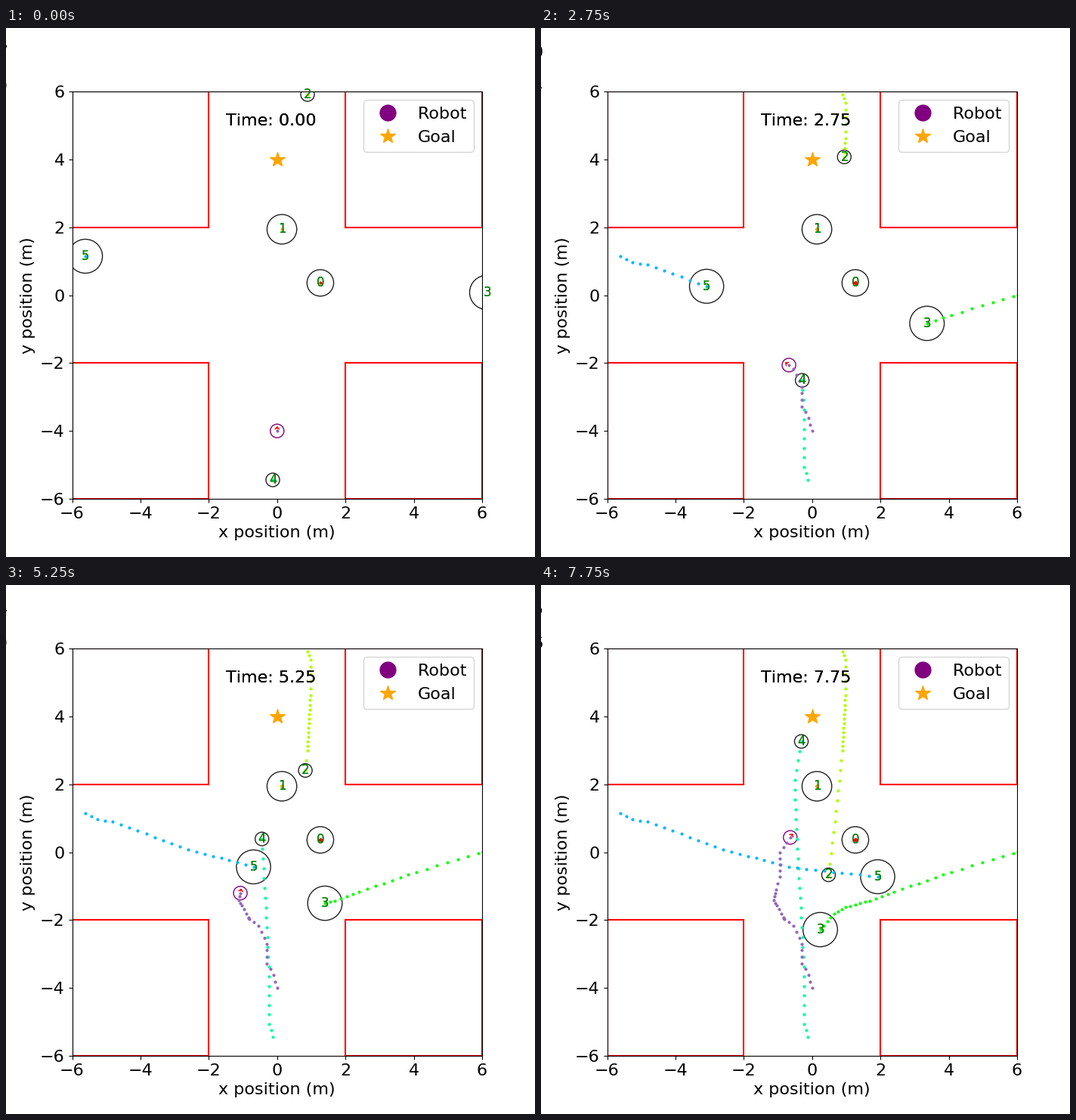
Recreate the animation shown at these times as a matplotlib script. Size 700 by 700 pixels, loop 8000 ms.

```python
import numpy as np
import matplotlib.pyplot as plt
from matplotlib.animation import FuncAnimation
from matplotlib.patches import ArrowStyle, Circle, FancyArrowPatch

STEPS, DT = 32, 0.25
ROBOT_R = 0.2


def path(*keys):
    """One position per step, linear between keys (step, x, y)."""
    t, x, y = np.transpose(keys)
    steps = np.arange(STEPS)
    return np.column_stack([np.interp(steps, t, x), np.interp(steps, t, y)])


robot_path = path((0, 0, -4), (2, -.105, -3.62), (4, -.3, -3.28),
                  (7, -.3, -2.695), (10, -.54, -2.16), (12, -.817, -1.96),
                  (14, -.835, -1.935), (17, -1.034, -1.57),
                  (19, -1.118, -1.414), (22, -1.056, -1.102),
                  (24, -.954, -.724), (28, -.935, -.01), (31, -.64, .434))

# Radius and path of each person
PEOPLE = [
    (.39, path((0, 1.265, .361))),
    (.435, path((0, .14, 1.941))),
    (.2, path((0, .89, 5.91), (2, .968, 5.667), (7, .968, 4.61),
              (19, .885, 2.995), (24, .736, 1.525), (31, .481, -.668))),
    (.505, path((0, 6.14, .08), (2, 5.89, -.044), (8, 4.08, -.579),
                (15, 2.405, -1.169), (19, 1.687, -1.425),
                (24, .968, -1.625), (27, .636, -1.814), (31, .238, -2.282))),
    (.2, path((0, -.127, -5.443), (2, -.229, -5.065), (8, -.244, -3.38),
              (24, -.49, 1.258), (27, -.503, 2.126), (31, -.315, 3.262))),
    (.5, path((0, -5.613, 1.147), (2, -5.248, .968), (4, -4.82, .902),
              (13, -2.594, .078), (21, -.69, -.434), (31, 1.919, -.724))),
]


def double_text(x, y, text="", **style):
    """Text that is painted twice, which darkens its edges."""
    label = ax.text(x, y, text, **style)
    ax.add_artist(label)
    return label


plt.rcParams.update({"font.family": "DejaVu Sans", "text.kerning_factor": 6})
fig, ax = plt.subplots(figsize=(7, 7), dpi=100)
ax.set(xlim=(-6, 6), ylim=(-6, 6))
ax.tick_params(labelsize=16)
ax.set_xlabel("x position (m)", fontsize=16)
ax.set_ylabel("y position (m)", fontsize=16)

for sx in (-1, 1):
    for sy in (-1, 1):
        ax.plot(sx * np.array([2, 6, 6, 2, 2]),
                sy * np.array([2, 2, 6, 6, 2]), color="red")

goal, = ax.plot([0], [4], "*", color="orange", ms=15)
robot_key = plt.Line2D([], [], marker="o", ls="none", color="purple", ms=15)
ax.legend([robot_key, goal], ["Robot", "Goal"], fontsize=16, loc="upper right")

cmap = plt.get_cmap("hsv", 10)
dots = dict(marker="o", ls="none", ms=3, mew=0)
trails = [ax.plot([], [], color=cmap(i), **dots)[0]
          for i in range(len(PEOPLE))]
robot_trail, = ax.plot([], [], color="tab:purple", **dots)

rings = [ax.add_patch(Circle((0, 0), r, fill=False, ec="0.13"))
         for r, _ in PEOPLE]
robot = ax.add_patch(Circle((0, 0), ROBOT_R, fill=False, ec="purple"))
arrow = ax.add_patch(FancyArrowPatch(
    (0, 0), (0, 1), color="red",
    arrowstyle=ArrowStyle("->", head_length=2, head_width=2)))

numbers = [double_text(0, 0, str(i), color="green", fontsize=12)
           for i in range(len(PEOPLE))]
clock = double_text(-1.5, 5, fontsize=16)

# Last digits of two score lines, nearly cut off by the left edge
scores = [ax.text(-8.2, y, "", fontsize=16) for y in (7, 6)]
digits = np.random.default_rng(4).integers(10, size=(STEPS, 2))


def draw(step):
    clock.set_text(f"Time: {step * DT:.2f}")
    for label, digit in zip(scores, digits[step]):
        label.set_text(str(digit))

    for (_, track), ring, number, trail in zip(PEOPLE, rings, numbers, trails):
        ring.center = track[step]
        number.set_position(track[step] - 0.11)
        trail.set_data(*track[:step + 1].T)

    pos = robot_path[step]
    move = pos - robot_path[step - 1] if step else np.array([0, 1])
    robot.center = pos
    arrow.set_positions(pos, pos + ROBOT_R * move / np.hypot(*move))
    robot_trail.set_data(*robot_path[:step + 1].T)
    return []


anim = FuncAnimation(fig, draw, frames=STEPS, interval=250, repeat=True,
                     repeat_delay=0, blit=False)
plt.show()
```
